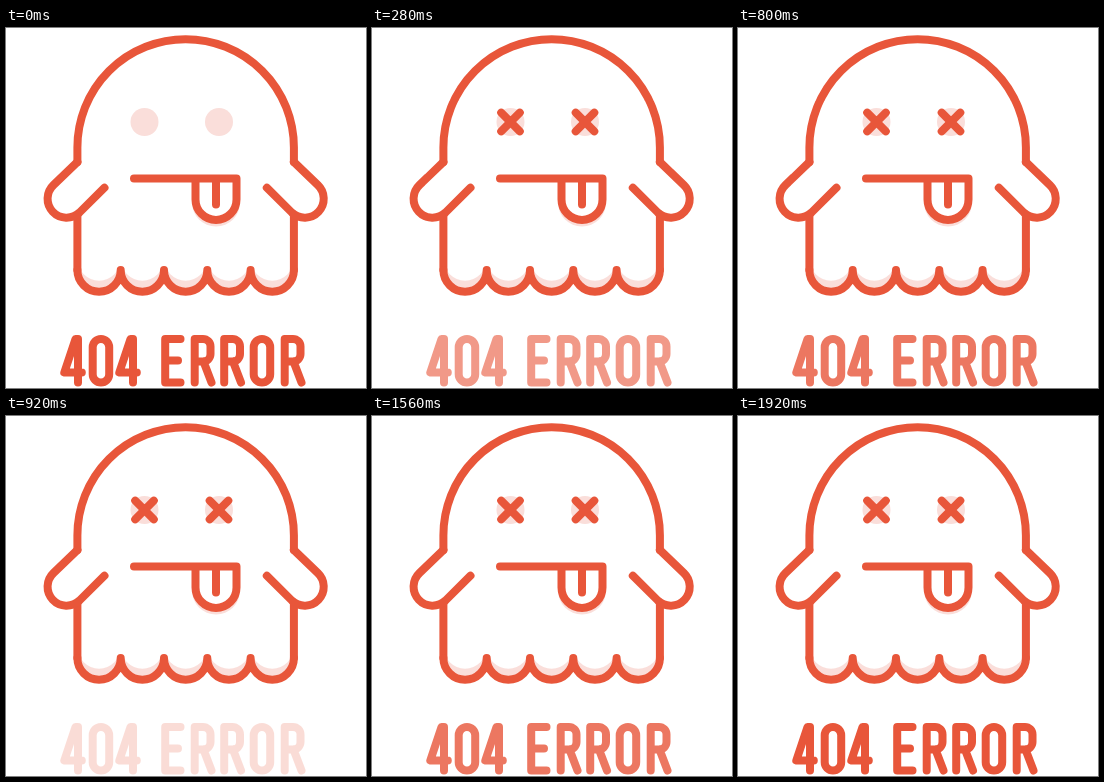
Animation of 360x360 px, one loop 2 s. Source, as an HTML page:

```html
<!DOCTYPE html>
<html lang="en">
<head>
<meta charset="utf-8">
<title>404 ERROR</title>
<style>
  html, body { margin: 0; width: 100%; height: 100%; overflow: hidden; background: #fff; }
  svg { display: block; width: 100vw; height: 100vh; }
  .line { fill: none; stroke: #e8563a; stroke-width: 8; stroke-linecap: round; stroke-linejoin: round; }
  .pale { fill: #fadeda; }
</style>
</head>
<body>
<svg viewBox="0 0 360 360">
  <defs>
    <path id="hem" d="M71.4 242a21.65 21.65 0 0 0 43.3 0a21.65 21.65 0 0 0 43.3 0a21.65 21.65 0 0 0 43.3 0a21.65 21.65 0 0 0 43.3 0a21.65 21.65 0 0 0 43.3 0"/>
    <path id="arm" d="M71.4 134L47.500 157A18.5 18.5 0 0 0 73.500 184.500L98.500 159.700"/>
    <path id="cross" d="M-9.3 -9.3L9.3 9.3M9.3 -9.3L-9.3 9.3"/>
    <path id="four" d="M18 354.500V311H15.500L4.300 344.500H21.800"/>
    <rect id="oval" x="4.200" y="311" width="16.500" height="43.500" rx="8.250"/>
    <path id="e" d="M19.500 311H4.200V354.500H19.500M4.200 332.500H17"/>
    <path id="r" d="M4.200 354.500V311H12.500a7.500 7.500 0 0 1 7.500 7.500v7.500a7.500 7.500 0 0 1 -7.500 7.500H4.200M13 333.500L21 354.500"/>
  </defs>

  <use href="#hem" class="pale"/>
  <use href="#hem" y="-11" fill="#fff"/>
  <path class="pale" d="M186 172v2.500a24 24 0 0 0 48 0v-2.500z"/>
  <path fill="#fff" d="M189.500 150.500v21a20.500 20.500 0 0 0 41 0v-21z"/>
  <circle class="pale" cx="138.500" cy="94" r="14"/>
  <circle class="pale" cx="213" cy="94" r="14"/>

  <g class="line">
    <path d="M71.4 134V119.400a108.250 108.250 0 0 1 216.500 0V134M71.4 187V242M287.900 187V242"/>
    <use href="#hem"/>
    <use href="#arm"/>
    <use href="#arm" transform="matrix(-1 0 0 1 359.300 0)"/>
    <path d="M128 150.400H230.500V171.400a20.500 20.500 0 0 1 -41 0V150.400M210 155V176.500"/>
    <g transform="translate(138.500 94)"><use href="#cross" class="cross"/></g>
    <g transform="translate(213 94)"><use href="#cross" class="cross"/></g>
  </g>

  <g id="label" class="line" role="img" aria-label="404 ERROR">
    <use href="#four" x="54"/>
    <use href="#oval" x="82.500"/>
    <use href="#four" x="109"/>
    <use href="#e" x="155"/>
    <use href="#r" x="184.500"/>
    <use href="#r" x="214"/>
    <use href="#oval" x="243.500"/>
    <use href="#r" x="274.500"/>
  </g>
</svg>
<script>
  const LOOP = 2000, STEP = 40, BLINK = 760;
  const FADE_OUT = 4, FADE_IN = 6, FAINT = 0.2;
  const label = document.getElementById('label');
  const crosses = document.querySelectorAll('.cross');

  function draw(now) {
    const t = now % LOOP;
    const step = Math.floor(t / STEP);
    const blinkStep = step % (BLINK / STEP);
    const dim = blinkStep < FADE_OUT
      ? blinkStep / FADE_OUT
      : Math.max(0, 1 - (blinkStep - FADE_OUT) / FADE_IN);
    label.style.opacity = 1 - (1 - FAINT) * dim;

    // The crosses settle onto the eyes during the first fade.
    const shown = Math.min(1, step / FADE_OUT);
    for (const cross of crosses) {
      cross.style.opacity = shown;
      cross.setAttribute('transform', `scale(${1.4 - 0.4 * shown})`);
    }
    requestAnimationFrame(draw);
  }
  draw(0);
</script>
</body>
</html>
```
